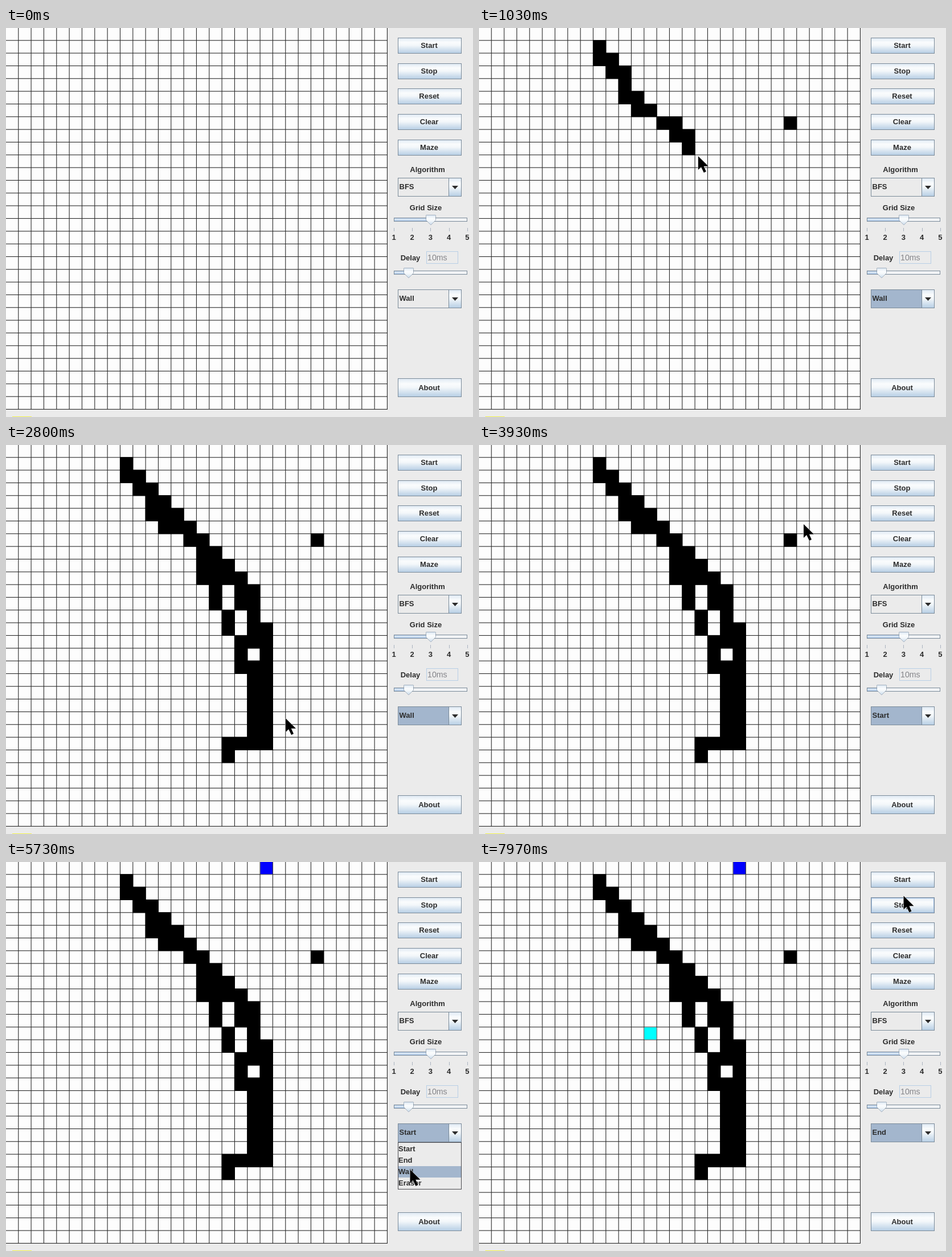
Recreate the animation shown at these times as an HTML page with a canvas. Size 820 by 683 pixels, loop 8 s.

```html
<!DOCTYPE html>
<html lang="en">
<head>
<meta charset="utf-8">
<title>Pathfinding grid</title>
<style>
  html, body { margin: 0; width: 100%; height: 100%; overflow: hidden; background: #ebebeb; }
  canvas { display: block; }
</style>
</head>
<body>
<canvas id="stage" width="820" height="683"></canvas>
<script>
const ctx = document.getElementById('stage').getContext('2d');
const LOOP = 8000, CELLS = 30, PITCH = 67 / 3, LINE = 1.1, PAINT_LAG = 35;
const PANEL = '#ebebeb', BORDER = '#7a8a99', FOCUS = '#a3b6cd', INK = '#2c2c2c';
const BOLD = 'bold 13px "Liberation Sans", Arial, sans-serif';
const PLAIN = '14.2px "Liberation Sans", Arial, sans-serif';
const TOOLS = ['Start', 'End', 'Wall', 'Eraser'];
const COLORS = { Start: '#0000ff', End: '#00ffff', Wall: '#000000' };

// The session is a list of pointer keys; everything else follows from it.
const keys = [];
const painted = [];
let tool = 'Wall';

function paint(col, row, time) {
  if (!painted.some(c => c.col === col && c.row === row)) {
    painted.push({ col, row, time: time + PAINT_LAG, color: COLORS[tool] });
  }
}

function move(time, x, y, action) {
  keys.push({ time, x, y, action });
  if (action === 'paint') paint(Math.floor(x / PITCH), Math.floor(y / PITCH), time);
  else if (action && action !== 'open') tool = action;
}

// Drags at constant speed through points in cell units, painting each cell crossed.
function drag(from, to, points) {
  const lengths = points.slice(1).map(([x, y], i) => Math.hypot(x - points[i][0], y - points[i][1]));
  const speed = (to - from) / lengths.reduce((a, b) => a + b);
  let time = from;
  points.forEach(([x, y], i) => {
    keys.push({ time, x: x * PITCH, y: y * PITCH, dragging: i < lengths.length });
    if (i === lengths.length) return;
    const [nextX, nextY] = points[i + 1], span = lengths[i] * speed;
    for (let u = 0; u < 1; u += .01) {
      paint(Math.floor(x + (nextX - x) * u), Math.floor(y + (nextY - y) * u), time + span * u);
    }
    time += span;
  });
}

move(0, 850, 470);
move(230, 788, 478, 'open');
move(400, 709, 544, 'Wall');
move(520, 547, 168, 'paint');
drag(740, 1405, [[9.5, 1.5], [11.5, 4.7], [14, 7], [19.05, 11.8], [18.9, 12.3],
  [20.1, 14.8], [19.9, 15.3], [20.5, 17], [20.5, 23.8]]);
move(1740, 410, 598);
drag(1850, 2390, [[17.3, 24.7], [17.4, 23.6], [19.4, 23.2], [19.2, 18], [18, 15],
  [17, 13], [15.2, 8.5], [15.1, 7.2], [11, 3.1], [9.5, 1.5]]);
move(2800, 491, 480);
move(3100, 788, 478, 'open');
move(3390, 706, 505, 'Start');
move(3930, 570, 139);
move(4100, 458, 10, 'paint');
move(4640, 796, 592);
move(4860, 788, 480, 'open');
move(5420, 712, 566);
move(5730, 709.5, 540);
move(5940, 709, 544, 'Wall');
move(6450, 788, 478, 'open');
move(6770, 714, 508);
move(6940, 709, 524, 'End');
move(7400, 303, 302, 'paint');
move(7970, 745.5, 59.5);

function pointerAt(t) {
  const i = keys.findLastIndex(k => k.time <= t);
  const a = keys[i], b = keys[i + 1] || a;
  let u = a === b ? 0 : (t - a.time) / (b.time - a.time);
  if (!a.dragging) u = u * u * (3 - 2 * u);
  return { x: a.x + (b.x - a.x) * u, y: a.y + (b.y - a.y) * u };
}

function toolAt(t) {
  const state = { tool: 'Wall', open: false, focused: false };
  for (const { time, action } of keys) {
    if (time > t || !action || action === 'paint') continue;
    state.open = action === 'open';
    state.focused = true;
    if (!state.open) state.tool = action;
  }
  return state;
}

function box(x, y, w, h, fill, line) {
  ctx.fillStyle = fill;
  ctx.fillRect(x, y, w, h);
  if (line) {
    ctx.strokeStyle = line;
    ctx.strokeRect(x + .5, y + .5, w - 1, h - 1);
  }
}

function label(text, x, y, align = 'center', font = BOLD, color = INK) {
  ctx.font = font;
  ctx.textAlign = align;
  ctx.fillStyle = color;
  ctx.fillText(text, x, y + 4.4);
}

function polygon(points, fill, line) {
  ctx.beginPath();
  points.forEach(([x, y]) => ctx.lineTo(x, y));
  ctx.closePath();
  if (line) {
    ctx.strokeStyle = line;
    ctx.stroke();
  }
  ctx.fillStyle = fill;
  ctx.fill();
}

function sheen(y, h) {
  const g = ctx.createLinearGradient(0, y, 0, y + h);
  g.addColorStop(0, '#dde8f3');
  g.addColorStop(.3, '#fafcfd');
  g.addColorStop(.5, '#f3f7fa');
  g.addColorStop(1, '#b8cfe5');
  return g;
}

function button(text, y, h, p) {
  box(688, y, 112, h + 1, sheen(y, h), BORDER);
  if (p.x > 688 && p.x < 800 && p.y > y - 4 && p.y < y + h) {
    ctx.strokeStyle = '#9dbbe0';
    ctx.strokeRect(689.5, y + 1.5, 109, h - 2);
  }
  label(text, 743, y + h / 2 + .5);
}

function combo(text, y, focused) {
  box(688, y, 112, 33, PANEL, BORDER);
  if (focused) box(689, y + 1, 88, 31, FOCUS);
  box(777, y, 23, 33, sheen(y, 32), BORDER);
  polygon([[783, y + 14], [794, y + 14], [788.5, y + 20]], INK);
  label(text, 690.5, y + 16, 'left');
}

function slider(y, x) {
  box(681, y, 129, 7, '#f1f3f5', BORDER);
  box(682, y + 1, x - 682, 5, '#b4cbe6');
  box(682, y + 2, x - 682, 2, '#dce9f6');
  const top = y - 4.5;
  polygon([[x - 8, top], [x + 8, top], [x + 8, top + 9], [x, top + 17], [x - 8, top + 9]],
    sheen(top, 20), '#65788f');
}

function grid(t) {
  const end = CELLS * PITCH;
  box(0, 0, end, end, '#fdfdfd');
  for (let k = 1; k <= CELLS; k++) {
    box(k * PITCH - LINE, 0, LINE, end, '#2a2a2a');
    box(0, k * PITCH - LINE, end, LINE, '#2a2a2a');
  }
  for (const { col, row, time, color } of painted) {
    if (t < time) continue;
    const edge = color === COLORS.Wall ? LINE : 0;
    const size = PITCH + 2 * edge - LINE;
    box(col * PITCH - edge, row * PITCH - edge, size, size, color);
  }
}

function popup(current, p) {
  box(688, 492, 112, 83, PANEL, '#4b4b50');
  const hovered = Math.floor((p.y - 494) / 20);
  const active = TOOLS[hovered] ? hovered : TOOLS.indexOf(current);
  box(689, 494 + active * 20, 110, 20, FOCUS);
  TOOLS.forEach((name, i) => label(name, 689, 504 + i * 20, 'left'));
}

function sidebar(t, p) {
  ['Start', 'Stop', 'Reset', 'Clear', 'Maze'].forEach((name, i) => {
    button(name, Math.round(17 + i * 44.7), 27, p);
  });
  button('About', 615, 32, p);

  label('Algorithm', 740, 249);
  combo('BFS', 263, false);

  label('Grid Size', 737, 316);
  slider(333, 746);
  for (let i = 0; i < 5; i++) {
    const x = 681 + i * 32.2;
    box(Math.round(x), 351, 1, 6, '#a9b3c0');
    label(i + 1, x, 367.5);
  }

  label('Delay', 710, 403.5);
  box(738, 392, 56, 22, PANEL, '#b8cfe5');
  label('10ms', 740, 403.5, 'left', PLAIN, '#85858a');
  slider(426, 707);

  const state = toolAt(t);
  combo(state.tool, 459, state.focused);
  if (state.open) popup(state.tool, p);
}

function drawPointer({ x, y }) {
  const shape = [[0, 0], [0, 24], [5.2, 19], [10, 29], [14, 27], [9.8, 17.8], [18, 17.8]];
  polygon(shape.map(([dx, dy]) => [x + dx, y + dy]), '#000', '#fff');
}

function frame(now) {
  const t = now % LOOP;
  const p = pointerAt(t);
  ctx.lineWidth = 1;
  box(0, 0, 820, 683, PANEL);
  box(11, 682, 34, 1, '#f2f24a');
  grid(t);
  sidebar(t, p);
  drawPointer(p);
  requestAnimationFrame(frame);
}
requestAnimationFrame(frame);
</script>
</body>
</html>
```
